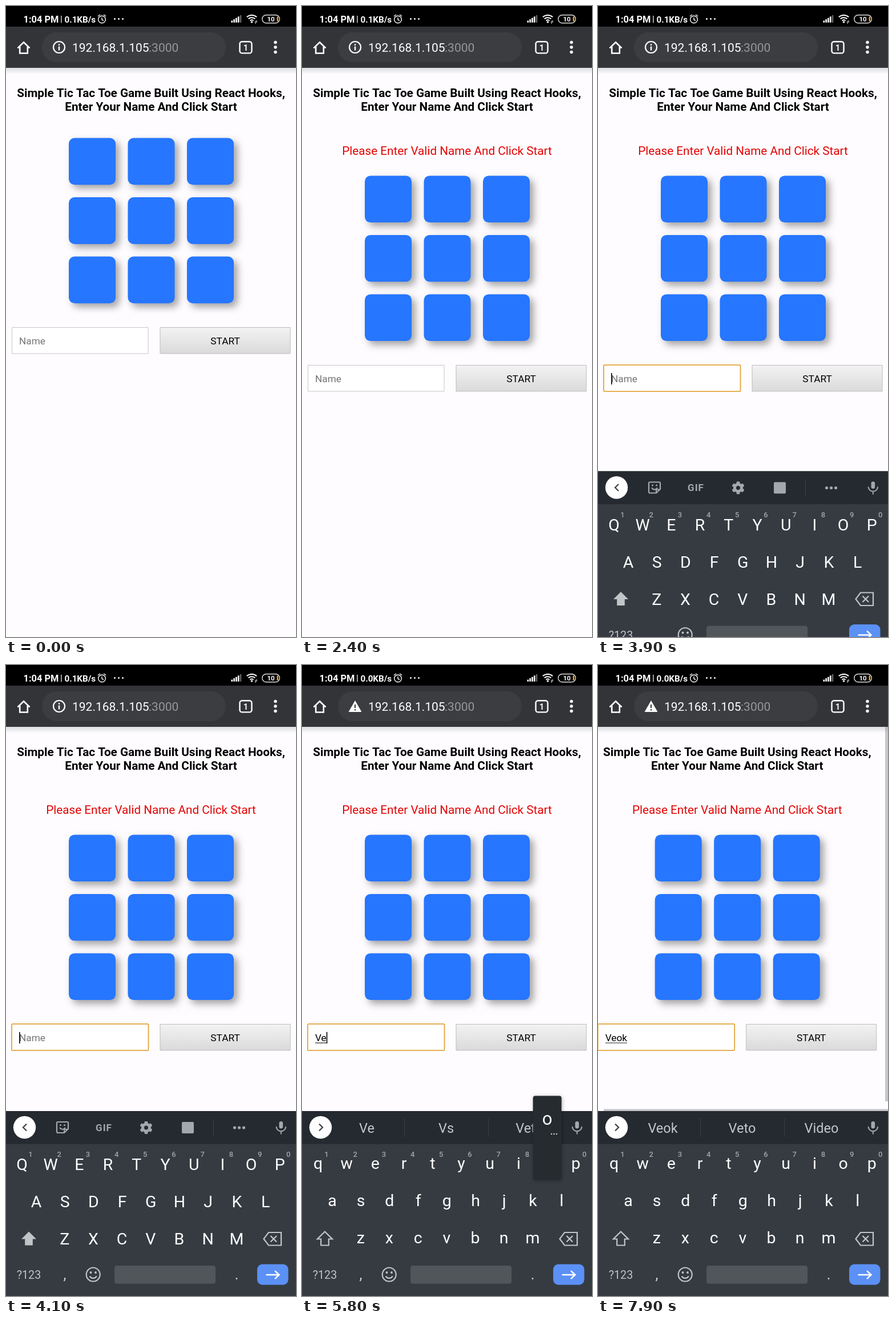
Animation, 508 px wide and 1102 px high, one loop 8000 ms. Source, as an HTML page with a canvas:

```html
<!DOCTYPE html>
<html lang="en">
<head>
<meta charset="utf-8">
<title>Tic Tac Toe</title>
<style>
  html, body { margin: 0; width: 100%; height: 100%; overflow: hidden; background: #fefcfe; }
  canvas { display: block; }
</style>
</head>
<body>
<canvas id="stage" width="508" height="1102"></canvas>
<script>
const c = document.getElementById('stage').getContext('2d');
const LOOP = 8000, STEP = 100;
const ICON = '#a4a8ac', WHITE = '#fff';

// Latest value in a list of [time, value] steps.
const at = (steps, t) => steps.reduce((now, [time, value]) => t >= time ? value : now, null);

const typed = [[0, ''], [5400, 'V'], [5600, 'Ve'], [6000, 'Veo'], [7300, 'Veok']];
const hints = [
  [0, null], [5500, ['V', 'Van', 'Very']], [5700, ['Ve', 'Vs', 'Vet']],
  [6100, ['Veo', 'Veto', 'Vow']], [7400, ['Veok', 'Veto', 'Video']]
];
const presses = [[0, ''], [5300, 'v'], [5400, ''], [5500, 'e'], [5600, ''],
  [5800, 'o'], [5900, ''], [7200, 'k'], [7300, '']];
const caretStart = [[0, 0], [3700, 3700], [5400, 5400], [5600, 5600], [6000, 6100], [7300, 7300]];

function text(s, x, y, size, color = WHITE, align = 'center', weight = 400) {
  c.font = `${weight} ${size}px Roboto, sans-serif`;
  c.textAlign = align;
  c.fillStyle = color;
  c.fillText(s, x, y);
}

function box(x, y, w, h, r, fill, stroke, line = 1) {
  c.beginPath();
  c.roundRect(x, y, w, h, r);
  paint(fill, stroke, line);
}

function circle(x, y, r, fill, stroke, line) {
  c.beginPath();
  c.arc(x, y, r, 0, 7);
  paint(fill, stroke, line);
}

function shape(d, fill, stroke, line) {
  const path = new Path2D(d);
  if (fill) { c.fillStyle = fill; c.fill(path); }
  if (stroke) { c.strokeStyle = stroke; c.lineWidth = line; c.stroke(path); }
}

function paint(fill, stroke, line) {
  if (fill) { c.fillStyle = fill; c.fill(); }
  if (stroke) { c.strokeStyle = stroke; c.lineWidth = line; c.stroke(); }
}

function shadow(color, blur, offset) {
  c.shadowColor = color;
  c.shadowBlur = blur;
  c.shadowOffsetX = c.shadowOffsetY = offset;
}
const noShadow = () => shadow('transparent', 0, 0);

function fade(y, h, from, to) {
  const g = c.createLinearGradient(0, y, 0, y + h);
  g.addColorStop(0, from);
  g.addColorStop(1, to);
  return g;
}

function statusBar(t) {
  box(0, 0, 508, 36, 0, '#000');
  text('1:04 PM', 30.5, 28.5, 16.4, WHITE, 'left', 600);
  text('|', 97, 28, 15, WHITE, 'center', 500);
  text(t < 4200 ? '0.1KB/s' : '0.0KB/s', 102.5, 28.5, 15.2, WHITE, 'left', 600);
  circle(168, 23.5, 6.3, null, WHITE, 1.4);
  shape('M168 20v4l3 1.5M161 18l4-3M175 18l-4-3', null, WHITE, 1.4);
  for (const x of [190.5, 197.5, 204.5]) circle(x, 22.5, 1.5, WHITE);
  for (let i = 0; i < 5; i++) {
    const h = 3.5 + 2.4 * i;
    box(394.5 + 3.8 * i, 29 - h, 2.6, h, 0.8, i < 4 ? WHITE : '#666');
  }
  for (const r of [4.5, 8.8, 13]) {
    c.beginPath();
    c.arc(430.5, 29, r, -2.3, -0.84);
    paint(null, WHITE, 2);
  }
  circle(430.5, 28, 1.8, WHITE);
  shape('M437 26v5M439 25v4', null, WHITE, 1);
  box(448.8, 15.8, 30.5, 14, 7, null, '#ddd', 1.4);
  box(474.5, 18.5, 2.5, 8.5, 1, '#f0a020');
  text('10', 464, 27, 11.5, WHITE, 'center', 600);
}

function addressBar(t) {
  box(0, 36, 508, 72, 0, '#333438');
  box(63, 46, 322, 52, 26, '#3c3d41');
  shape('M20.5 73.5L31 63.2L41.5 73.5M24.2 71V82.5H37.8V71', null, WHITE, 2.6);
  if (t < 5400) {
    circle(93, 72, 10, null, WHITE, 2.2);
    shape('M93 70.5v7M93 66.3v2.5', null, WHITE, 2.4);
  } else {
    shape('M93 62L104.5 82H81.5Z', WHITE);
    shape('M93 69v6M93 77v2.4', null, '#3c3d41', 2.2);
  }
  text('192.168.1.105', 116, 80, 21, WHITE, 'left');
  text(':3000', 250, 80, 21, '#96979a', 'left');
  box(409.5, 62.2, 21, 20.2, 4, null, WHITE, 2.4);
  text('1', 420, 77.5, 14, WHITE, 'center', 700);
  for (const y of [63.5, 72, 80.5]) circle(472, y, 2.7, WHITE);
}

function page(t) {
  const warned = t >= 2300, focused = t >= 3700;
  const value = at(typed, t);
  const scroll = 10.3 * Math.min(1, Math.max(0, (t - 7400) / 200));
  c.save();
  c.translate(-scroll, 0);
  text('Simple Tic Tac Toe Game Built Using React Hooks,', 254, 159, 20.7, '#000', 'center', 700);
  text('Enter Your Name And Click Start', 254, 183.3, 20.7, '#000', 'center', 700);
  if (warned) {
    text('Please Enter Valid Name And Click Start', 254, 259.5, 20.7, '#e40404');
    c.translate(0, 65.9);
  }

  shadow('rgba(0,0,0,.36)', 13, 6.5);
  for (let i = 0; i < 9; i++)
    box(110 + 103.5 * (i % 3), 230.5 + 103.5 * Math.floor(i / 3), 82, 81.7, 10, '#2676ff');
  noShadow();

  if (focused) box(10, 561, 239.5, 46.3, 1.5, WHITE, '#e3a53c', 1.8);
  else box(10.5, 561.5, 238.5, 45.5, 0, WHITE, '#c8c8c8');
  text(value || 'Name', 23, 590.6, 17.25, value ? '#000' : '#757575', 'left');
  const width = value ? c.measureText(value).width : 0;
  if (value) box(23, 593.5, width, 1.2, 0, '#222');
  if (focused && (t - at(caretStart, t)) % 1000 < 500)
    box(23 + width, 575, 1.6, 20, 0, '#000');

  box(270, 561.5, 228, 45.5, 0, fade(561, 46, '#f3f3f3', '#dadada'), '#bcbcbc');
  text('START', 384, 590.6, 17.25, '#000');
  c.restore();

  box(0, 108, 508, 11, 0, fade(108, 11, 'rgba(40,70,80,.17)', 'rgba(40,70,80,0)'));
  if (t >= 7500) {
    const bar = `rgba(128,128,132,${t < 7800 ? 0.5 : 0.44})`;
    box(503, 108, 5, 654, 0, bar);
    box(10, 775.5, 498, 4, 0, bar);
  }
}

const rows = ['qwertyuiop', 'asdfghjkl', 'zxcvbnm'].map((letters, i) =>
  ({ letters, x: [28, 53, 102.7][i], y: 872 + 65 * i }));

function mic() {
  box(478.5, 797, 6.6, 12.5, 3.3, ICON);
  shape('M473.5 806a8.3 8.3 0 0 0 16.6 0M481.8 814.5v5', null, ICON, 2);
}

function toolbar(words) {
  box(0, 779, 508, 57.5, 0, '#252a30');
  circle(32.5, 807.5, 19.7, WHITE);
  shape(words ? 'M30 801.5l6 6l-6 6' : 'M36 801.5l-6 6l6 6', null, '#41464b', 2.3);
  mic();
  if (words) {
    words.forEach((word, i) => text(word, 113.5 + 139 * i, 817, 23.5, '#c3c6ca'));
    for (const x of [179, 326]) box(x, 792, 1, 31, 0, '#3b4046');
    return;
  }
  shape('M91 798h16a2 2 0 0 1 2 2v10l-7 7h-11a2 2 0 0 1-2-2v-15a2 2 0 0 1 2-2Z', null, ICON, 2.2);
  shape('M94 808q5 6 10 0M102 817v-6h7', null, ICON, 2);
  for (const x of [95.5, 102.5]) circle(x, 803.5, 1.5, ICON);
  c.letterSpacing = '1px';
  text('GIF', 171.5, 813.5, 17, ICON, 'center', 700);
  c.letterSpacing = '0px';
  for (let i = 0; i < 6; i++) {
    c.save();
    c.translate(245.5, 808);
    c.rotate(i * Math.PI / 3);
    box(-2.8, -11, 5.6, 6, 1, ICON);
    c.restore();
  }
  circle(245.5, 808, 6, null, ICON, 5);
  box(308, 798, 21, 20, 2, ICON);
  box(363, 793, 1, 29, 0, '#3b4046');
  for (const x of [400.5, 408.5, 416.5]) circle(x, 808, 2.6, ICON);
}

function keyboard(t) {
  if (t < 3900) return;
  const upper = t < 5400;
  c.save();
  c.translate(0, 33.5 * Math.max(0, 1 - (t - 3900) / 150) ** 2);
  box(0, 779, 508, 360, 0, '#353b41');
  toolbar(at(hints, t));

  for (const { letters, x, y } of rows)
    [...letters].forEach((key, i) => {
      const keyX = x + 50.2 * i;
      text(upper ? key.toUpperCase() : key, keyX, y + (upper ? 10 : 8), 28.5);
      if (y === 872) text((i + 1) % 10, keyX + 15, 859, 13, '#a2a6aa', 'center', 500);
    });

  const arrow = 'M40 989.5L53 1002.5H46.8V1013.5H33.2V1002.5H27Z';
  if (upper) shape(arrow, '#c2c5c8');
  else shape(arrow, null, '#c2c5c8', 2.2);
  shape('M460 991H482V1013.5H460L451.5 1002.2ZM463.5 997l10.5 10.5M474 997l-10.5 10.5', null, '#c2c5c8', 2.2);
  text('?123', 40, 1072, 19.7, '#bec1c5');
  text(',', 103, 1073, 25, '#d4d6d8');
  text('.', 404, 1073, 25, '#d4d6d8');
  circle(152.7, 1064.5, 12, null, '#c2c5c8', 2.2);
  for (const x of [148.5, 157]) circle(x, 1061, 1.9, '#c2c5c8');
  shape('M146.5 1067.5q6.2 7 12.4 0', null, '#c2c5c8', 2.2);
  box(190, 1049, 177, 31.5, 4, '#51565b');
  box(440, 1046.5, 54.5, 36, 9, '#5b90f5');
  shape('M455.5 1065H478M471 1058l7.5 7l-7.5 7', null, WHITE, 2.4);

  const pressed = at(presses, t);
  if (pressed) popup(pressed, upper);
  c.restore();
}

function popup(key, upper) {
  const row = rows.find(r => r.letters.includes(key));
  const x = row.x + 50.2 * row.letters.indexOf(key);
  shadow('rgba(0,0,0,.3)', 6, 1);
  box(x - 25, row.y - 119.5, 50, 147, 4, '#262b30');
  noShadow();
  text(upper ? key.toUpperCase() : key, x, row.y - 69, 31);
  if ('eo'.includes(key))
    for (const dx of [7.5, 12, 16.5]) circle(x + dx, row.y - 53, 1.2, '#d0d2d4');
}

function draw(now) {
  const t = Math.floor(now % LOOP / STEP) * STEP;
  box(0, 0, 508, 1102, 0, '#fefcfe');
  page(t);
  statusBar(t);
  addressBar(t);
  keyboard(t);
  requestAnimationFrame(draw);
}
requestAnimationFrame(draw);
</script>
</body>
</html>
```
